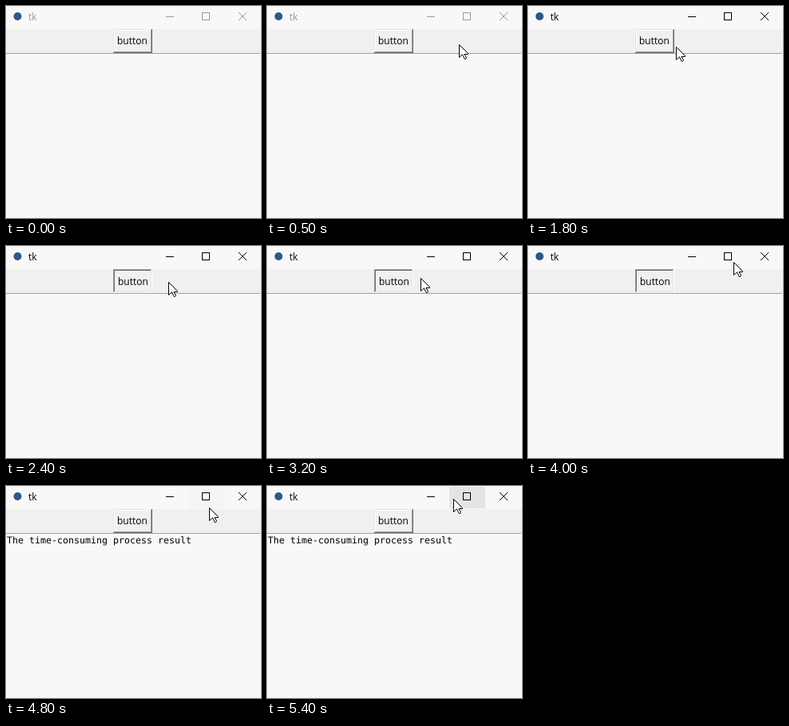
These frames come from a looping animation (319 by 266 pixels, 8300 ms). An HTML page:

```html
<!DOCTYPE html>
<html lang="en">
<head>
<meta charset="utf-8">
<title>tk</title>
<style>
  html, body { margin: 0; width: 100%; height: 100%; overflow: hidden; background: #f8f8f8; }
  svg { display: block; width: 100vw; height: 100vh; }
  .ui { font: 12px "Open Sans", "Noto Sans", sans-serif; }
  .mono { font: 11.63px "DejaVu Sans Mono", monospace; text-rendering: geometricPrecision; }
  .crisp { shape-rendering: crispEdges; }
</style>
</head>
<body>
<svg viewBox="0 0 319 266" preserveAspectRatio="none">
  <rect width="319" height="266" fill="#f8f8f8"/>
  <rect id="hover" class="crisp" x="228" y="1" width="45" height="27" fill="#e4e4e5"/>
  <circle cx="14.5" cy="13" r="5" fill="#2d5787"/>
  <g id="title">
    <text class="ui" x="28" y="18" fill="currentColor">tk</text>
    <g fill="none" stroke="currentColor">
      <path class="crisp" d="M200 13.5h10M245.5 8.5h9v9h-9z"/>
      <path d="M291 8l10 10M301 8l-10 10"/>
    </g>
  </g>

  <g class="crisp">
    <rect y="29" width="319" height="30" fill="#f0f0f0"/>
    <rect y="59" width="318" height="1" fill="#a0a0a0"/>
  </g>

  <g id="raised">
    <g class="crisp" fill="none">
      <path d="M134.5 58V29.5H182" stroke="#e3e3e3"/>
      <path d="M135.5 57V30.5H181" stroke="#fff"/>
      <path d="M135 57.5H181.5V30" stroke="#a0a0a0"/>
      <path d="M134 58.5H182.5V29" stroke="#696969"/>
    </g>
    <text class="ui" x="139" y="48">button</text>
  </g>
  <g id="sunken">
    <rect class="crisp" x="134" y="29" width="49" height="30" fill="#f2eff1"/>
    <g class="crisp" fill="none">
      <path d="M134.5 58V29.5H182" stroke="#a0a0a0"/>
      <path d="M135.5 57V30.5H181" stroke="#696969"/>
      <path d="M135 57.5H181.5V30" stroke="#e3e3e3"/>
      <path d="M134 58.5H182.5V29" stroke="#fff"/>
    </g>
    <text class="ui" x="140" y="49">button</text>
  </g>

  <text id="result" class="mono" x="1" y="72">The time-consuming process result</text>

  <path id="cursor" d="M.5.5V16.5L4.5 12.8 7.2 18.5H8.5L9.5 17 7 12.5H11.5V11.5Z"
        fill="#fff" stroke="#000" stroke-linejoin="round"/>
</svg>
<script>
  const LOOP = 8300, STEP = 100;
  const ENTER = 200, ACTIVE = 1100, PRESS = 1900, DONE = 4700, HOVER = 4800;

  const point = (x, y) => ({ x, y });
  const entry = point(308, 45), rest = point(200, 54), click = point(179, 50);
  const corner = point(225, 19), beside = point(190, 43), controls = point(266, 19);
  const below = point(254, 27), end = point(233, 16);

  // Each sweep eases along a quadratic curve, bent towards one point
  const sweep = (start, stop, from, bend, to) => ({ start, stop, from, bend, to });
  const sweeps = [
    sweep(ENTER, 800, entry, point(225, 46), rest),
    sweep(1400, 2000, rest, point(190, 53), click),
    sweep(2100, 2700, click, point(204, 55), corner),
    sweep(2700, 3100, corner, point(215, 32), beside),
    sweep(3100, 3800, beside, point(207, 15), controls),
    sweep(3800, 4800, controls, point(219, 24), below),
    sweep(4800, 5400, below, point(248, 20), end)
  ];

  const [title, hover, raised, sunken, result, cursor] =
    ["title", "hover", "raised", "sunken", "result", "cursor"].map(id => document.getElementById(id));
  const show = (el, on) => el.setAttribute("visibility", on ? "visible" : "hidden");
  const clamp = v => Math.max(0, Math.min(1, v));
  const ease = u => u * u * (3 - 2 * u);
  const curve = (a, b, c, u) => Math.round((1 - u) ** 2 * a + 2 * u * (1 - u) * b + u * u * c);

  function pointerAt(t) {
    const { start, stop, from, bend, to } = sweeps.findLast(s => s.start <= t) || sweeps[0];
    const u = ease(clamp((t - start) / (stop - start)));
    return [curve(from.x, bend.x, to.x, u), curve(from.y, bend.y, to.y, u)];
  }

  function draw(now) {
    const t = Math.floor((now % LOOP) / STEP) * STEP;
    const pressed = t >= PRESS && t < DONE;
    title.setAttribute("color", t < ACTIVE ? "#999" : "#000");
    hover.setAttribute("opacity", t < HOVER ? 0 : clamp(0.15 + (t - HOVER) / 200));
    show(raised, !pressed);
    show(sunken, pressed);
    show(result, t >= DONE);
    show(cursor, t >= ENTER);
    cursor.setAttribute("transform", `translate(${pointerAt(t)})`);
  }

  const began = performance.now();
  function tick() {
    draw(performance.now() - began);
    requestAnimationFrame(tick);
  }
  tick();
</script>
</body>
</html>
```
